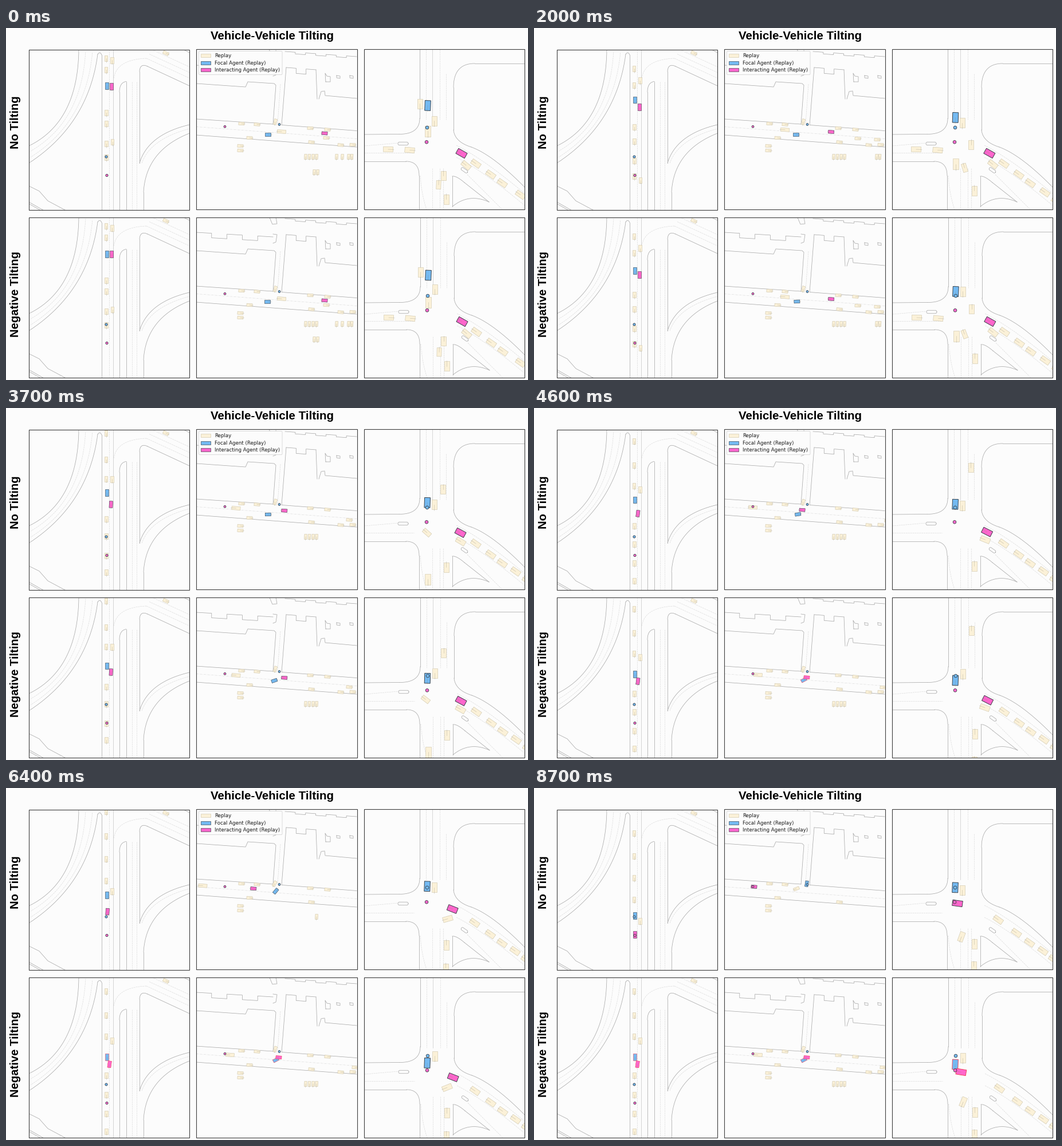
A matplotlib script for the animation above (8800 ms loop, 911 px wide and 615 px high).

```python
import numpy as np
import matplotlib.pyplot as plt
from matplotlib.animation import FuncAnimation
from matplotlib.patches import Circle, FancyBboxPatch, Polygon, Rectangle

W, H, DPI = 911, 615, 64
FRAMES, STEP = 88, 100
LAST = FRAMES - 1
PX = 72 / DPI                      # points per pixel

PAPER, FRAME, INK = "#fcfcfc", "#3c3c3c", "#303840"
TAN, BLUE, PINK = "#fbf1d8", "#74baf2", "#ff66cc"
TAN_EDGE, HIT_EDGE = "#d0c7ad", "#f03c50"
ROAD, LANE = "#a8a8a8", "#d9d9d9"

fig = plt.figure(figsize=(W / DPI, H / DPI), dpi=DPI, facecolor=PAPER)
ax = fig.add_axes([0, 0, 1, 1])
ax.set_xlim(0, W)
ax.set_ylim(H, 0)
ax.axis("off")


class Panel:
    """One map window; its replay runs `lead` steps ahead and halts at `stop`."""

    def __init__(self, x, y, shift=(0, 0), stop=LAST, lead=0, outline=0.55):
        self.shift, self.stop, self.lead = np.array(shift), stop, lead
        self.outline = outline
        self.box = Rectangle((x, y), 280.5, 280, fc="none", ec=FRAME, lw=1.1 * PX, zorder=9)
        ax.add_patch(self.box)

    def add(self, artist):
        ax.add_artist(artist)
        artist.set_clip_path(self.box)
        return artist


LEFT = [Panel(39.5, 37.5), Panel(39.5, 331, (0, 293), 49)]
MID = [Panel(332, 37.3), Panel(332, 331, (0, 292), 42)]
RIGHT = [Panel(624.5, 37.3, outline=0.9),
         Panel(624.5, 331.3, (1, 294), 85, lead=2, outline=0.9)]


# ---------- road maps ----------
def bezier(a, b, c, s):
    a, b, c = (np.array(v, float) for v in (a, b, c))
    return (1 - s) ** 2 * a + 2 * s * (1 - s) * b + s * s * c


def line(panels, pts, color=ROAD, lw=0.75, ls="-"):
    for p in panels:
        x, y = (np.array(pts, float) + p.shift).T
        p.add(plt.Line2D(x, y, color=color, lw=lw * PX, ls=ls, zorder=1))


def edge(panels, *pts):
    line(panels, pts)


def arc(a, b, c):
    return bezier(a, b, c, np.linspace(0, 1, 30)[:, None])


def bend(panels, a, corner, c):
    line(panels, arc(a, corner, c))


def lane(panels, pts, ls=(0, (5, 1.5))):
    line(panels, pts, LANE, 0.6, ls)


def uprights(panels, xs, y0, y1):
    for x in xs:
        lane(panels, [(x, y0), (x, y1)])


def pill(panels, x, y, w, h, deg):
    a = np.linspace(0, 2 * np.pi, 41)
    px = np.cos(a) * h / 2 + np.sign(np.cos(a)) * (w - h) / 2
    py = np.sin(a) * h / 2
    c, s = np.cos(np.radians(deg)), np.sin(np.radians(deg))
    line(panels, np.c_[x + c * px - s * py, y + s * px + c * py])


def roof(panels, a, b, teeth, depth):
    """Stepped wall from a to b, every second stretch pushed in."""
    u = np.repeat(np.linspace(0, 1, 2 * teeth + 2), 2)[1:-1, None]
    push = np.tile([0, 0, depth, depth], teeth + 1)[:len(u)]
    pts = np.array(a) + u * (np.array(b) - a)
    line(panels, pts + np.c_[0 * push, push])


def left_map(p):
    outer = arc((127, 37), (126, 164), (40, 206))
    inner = arc((160, 46), (144, 168), (40, 236))
    line(p, outer)
    line(p, inner)
    for k in (0.36, 0.72):
        lane(p, outer + k * (inner - outer))
    bend(p, (160, 46), (164, 40), (167, 47))
    edge(p, (167, 47), (167, 318))
    uprights(p, [180], 37, 318)
    line(p, [(187, 37), (187, 318)], color="#c8c8c8")
    lane(p, arc((188, 88), (193, 55), (245, 53)))
    edge(p, (198, 318), (198, 112))
    bend(p, (198, 112), (198, 95), (210, 93.5))
    edge(p, (210, 93.5), (210, 318))
    uprights(p, (220, 228), 94, 318)
    edge(p, (233, 236), (233, 76))
    bend(p, (233, 76), (234, 61), (247, 67))
    edge(p, (247, 67), (320, 101))
    bend(p, (233, 236), (248, 186), (320, 169))
    edge(p, (240, 318), (240, 287))
    bend(p, (240, 287), (244, 214), (320, 184))
    lane(p, arc((237, 236), (252, 194), (320, 176)))
    for k in range(3):
        x, y = 245 + 5 * k, 53 - 7.5 * k
        lane(p, [(x, y), (320, y + (320 - x) * 0.46)])
    edge(p, (308, 37), (320, 43))
    edge(p, (40, 276), (58, 285), (73, 302), (103, 318))
    for y in (304, 307):
        edge(p, (40, y), (40 + 1.75 * (318 - y), 318))


def mid_map(p):
    edge(p, (332, 159), (466, 168))
    edge(p, (332, 187), (612, 208))
    lane(p, [(332, 172.5), (612, 193.5)], ls=(0, (6, 2, 1, 2)))
    lane(p, [(479, 98), (474, 167)])
    edge(p, (332, 97), (418, 103), (422, 94), (468, 97), (471, 100), (466, 168))
    edge(p, (612, 179.5), (481, 169.5), (489, 69))
    roof(p, (489, 69), (541, 73), 1, 9)
    edge(p, (541, 73), (543, 124))
    edge(p, (546, 124), (550, 111), (556, 110), (557, 118), (612, 123))
    edge(p, (558, 94), (557, 79), (560, 84), (566, 85), (566, 94), (558, 94))
    for x in (577, 600):
        edge(p, (x, 83), (x + 6, 84), (x + 6, 88), (x, 87), (x, 83))
    roof(p, (487, 41), (612, 50), 3, 3)
    edge(p, (459, 37), (465, 51), (473, 50), (471, 39))
    roof(p, (332, 65), (466, 73), 2, 8)
    edge(p, (466, 84), (471, 82), (473, 69), (466, 68))


def right_map(p):
    edge(p, (722, 37), (722, 158))
    bend(p, (722, 158), (722, 185.5), (686, 185.5))
    edge(p, (686, 185.5), (625, 186))
    edge(p, (625, 233), (698, 233))
    bend(p, (698, 233), (721, 233), (721, 258))
    edge(p, (721, 258), (721, 317))
    edge(p, (905, 62), (818, 62))
    bend(p, (818, 62), (781, 62), (781, 104))
    edge(p, (781, 104), (781, 178))
    bend(p, (781, 178), (783, 199), (812, 208))
    bend(p, (812, 208), (850, 222), (905, 278))
    edge(p, (779, 312), (779, 259))
    bend(p, (779, 259), (786, 258), (800, 270))
    edge(p, (800, 270), (843, 304))
    bend(p, (843, 304), (808, 288), (779, 312))
    pill(p, 693, 202, 18, 5.5, 0)
    pill(p, 800, 248.5, 13, 5, 35)
    line(p, [(744, 37), (744, 160)], color="#cccccc")
    uprights(p, (733, 757), 37, 160)
    uprights(p, [768], 80, 160)
    uprights(p, (744, 757, 763), 245, 317)
    lane(p, [(625, 206), (684, 201)])
    lane(p, [(625, 218), (712, 218)])
    lane(p, arc((723, 258), (725, 290), (734, 317)))
    for y in (205, 226):
        lane(p, arc((786, y), (835, y + 25), (905, y + 84)))
    lane(p, [(805, 256), (866, 317)])


left_map(LEFT)
mid_map(MID)
right_map(RIGHT)


# ---------- motion rules: time -> (x, y, heading) ----------
def facing(deg):
    return np.array([np.cos(np.radians(deg)), np.sin(np.radians(deg))])


def park(x, y, deg):
    return lambda t: (x, y, deg)


def glide(a, b, deg, sway=0):
    """Steady run over the loop; sway > 0 gets ahead half-way, < 0 lags."""
    a, b = np.array(a, float), np.array(b, float)

    def rule(t):
        u = t / LAST
        return (*(a + (b - a) * u + 4 * u * (1 - u) * sway * facing(deg)), deg)
    return rule


def brake(a, b, deg, tau):
    a, b = np.array(a, float), np.array(b, float)
    return lambda t: (*(b + (a - b) * np.exp(-t / tau)), deg)


def turn(a, b, c, rate):
    """Follow a curve, nose along its tangent."""
    def rule(t):
        s = rate(t)
        dx, dy = (1 - s) * (np.subtract(b, a)) + s * np.subtract(c, b)
        return (*bezier(a, b, c, s), np.degrees(np.arctan2(dy, dx)))
    return rule


def power(span, n):
    return lambda t: min(t / span, 1) ** n


def ease(t0, t1):
    def rate(t):
        u = np.clip((t - t0) / (t1 - t0), 0, 1)
        return u * u * (3 - 2 * u)
    return rate


def merge(rule, dx, lean, rate):
    """Add a sideways lane change to another rule."""
    def moved(t):
        x, y, deg = rule(t)
        s = rate(t)
        return x + dx * s, y, deg + 4 * lean * s * (1 - s)
    return moved


# ---------- vehicles ----------
class Car:
    def __init__(self, panel, rule, size, fill, span):
        self.panel, self.rule, self.size, self.span = panel, rule, size, span
        self.agent = fill != TAN
        z = 4 if self.agent else 2
        lw = panel.outline if self.agent else 0.6
        self.body = panel.add(Polygon([(0, 0)] * 4, fc=fill, ec=TAN_EDGE, lw=lw * PX,
                                      joinstyle="miter", zorder=z))
        self.nose = panel.add(plt.Line2D([], [], color="#8c8674", lw=0.6 * PX,
                                         alpha=0.45, zorder=z + 0.1))

    def draw(self, frame):
        p = self.panel
        t = min(frame + (0 if self.agent else p.lead), p.stop)
        for part in (self.body, self.nose):
            part.set_visible(self.span[0] <= t < self.span[1])
        x, y, deg = self.rule(t)
        mid = np.array([x, y]) + p.shift
        ahead, side = facing(deg), facing(deg + 90)
        l, w = self.size[0] / 2, self.size[1] / 2
        self.body.set_xy([mid + i * l * ahead + j * w * side
                          for i, j in ((1, 1), (1, -1), (-1, -1), (-1, 1))])
        tip = mid + (l + 1.5) * ahead
        self.nose.set_data([mid[0], tip[0]], [mid[1], tip[1]])
        if self.agent:
            hit = p.shift.any() and frame >= p.stop
            self.body.set_edgecolor(HIT_EDGE if hit else INK)


cars = []


def car(panels, rule, size, fill=TAN, span=(0, FRAMES)):
    cars.extend(Car(p, rule, size, fill, span) for p in panels)


def dots(panels, blue, pink, r):
    for p in panels:
        for spot, c in ((blue, BLUE), (pink, PINK)):
            p.add(Circle(spot + p.shift, r, fc=c, ec=INK, lw=0.8 * PX, zorder=6))


# left junction: a queue rolling down the road
def down(x, y0, y1, sway=0):
    return glide((x, y0), (x, y1), 90, sway)


S, A = (10, 5.5), (11.5, 6)
car(LEFT, park(279, 44, 25), S)
for y0, speed, sway in ((-65, 1.66, 0), (-11, 1.49, 0), (53, 1.2, -8), (73, 1.4, -1)):
    car(LEFT, down(174.7, y0, y0 + speed * LAST, sway), S)
for y0, speed in ((148, 1.25), (167, 1.55), (202, 1.5), (226, 1.65)):
    car(LEFT, down(175, y0, y0 + speed * LAST), S, span=(0, 58))
car(LEFT, down(184.5, 56, 232, -7), (11, 6))
car(LEFT, down(185.5, 199, 490), S)
car(LEFT[:1], down(175.5, 101, 223, -5), A, BLUE)
car(LEFT[1:], down(175.5, 102, 244, -5), A, BLUE)
car(LEFT, merge(down(184, 102, 256, 1), -8, 8, ease(28, 75)), A, PINK)
dots(LEFT, (175, 225), (176, 257.5), 2.1)

# middle street: parked cars leave over time
S, A = (10, 5), (10, 5.5)
for x, y in ((411, 167), (438, 168.5), (425, 192), (409, 206), (409, 214), (533, 199.5)):
    car(MID, park(x, y, 4), S)
for x, y, end in ((531, 175, 80), (561, 177.5, 80), (584, 204.5, 64), (605, 204, 64)):
    car(MID, park(x, y, 4), S, span=(0, end))
for x, y, count, gap, end in ((523, 225, 3, 6.5, 62), (542, 225, 1, 0, 80),
                              (577, 225, 2, 10, 6), (598, 225, 2, 5.5, 30),
                              (538, 252, 2, 6, 20)):
    for i in range(count):
        car(MID, park(x + i * gap, y, 93), (9, 4.5), span=(0, end))
car(MID, turn((470, 164), (468, 172), (458, 176), power(LAST, 5)), S)
car(MID, glide((481, 181), (294, 167), 184), (15, 6))
for x, y, start in ((559, 192, 0), (525, 190, 5)):
    car(MID, glide((x, y), (x + 174, y + 13), 4), S, span=(start, FRAMES))
car(MID[:1], turn((457, 186), (473, 186), (476, 167), ease(34, 90)), A, BLUE)
car(MID[1:], turn((456, 186), (482, 186), (476, 166), ease(8, 90)), A, BLUE)
car(MID, glide((556, 184), (384, 172.5), 184, -3), A, PINK)
dots(MID, (477, 168.5), (382, 172.3), 1.9)

# right crossing
S, A = (17, 9), (17.5, 10)
car(RIGHT, park(667, 212, 2), S, span=(0, 35))
car(RIGHT, park(704.5, 213.3, 5), S, span=(0, 29))
car(RIGHT, park(722, 132, 90), S, span=(0, 8))
car(RIGHT, down(747, 162, 178), S)
car(RIGHT, down(736, 180, 548, -38), (19, 9.5))
car(RIGHT, glide((763, 258), (762, -122), 270, -47), (16, 9))
car(RIGHT, brake((768, 299), (768, 272), 270, 25), S)
car(RIGHT, brake((767, 640), (767, 309.5), 270, 15), (15, 9))
car(RIGHT, turn((755, 274), (757, 212), (695, 200), power(55, 1.3)), (15, 8), span=(0, 46))
car(RIGHT, turn((803, 240), (765, 208), (746, 260), power(LAST, 2.4)), S)
for x, y, move in ((820, 237, 12), (846, 256, 5), (866, 271, 1.5)):
    end = np.array([x, y]) + move * facing(215)
    car(RIGHT, turn((x, y), (np.array([x, y]) + end) / 2, end, power(LAST, 5)), S)
for x, y, tau in ((888, 284.5, 20), (905, 298, 50)):
    car(RIGHT, brake(np.array([x, y]) - 12 * facing(215), (x, y), 215, tau), S)
car(RIGHT[:1], brake((736, 135.5), (735, 175.5), 92, 27), A, BLUE)
car(RIGHT[1:], brake((736, 138), (734, 191), 92, 26), A, BLUE)
car(RIGHT, turn((795, 219), (772, 206), (739, 201.5), power(LAST, 3.7)), A, PINK)
dots(RIGHT, (735, 174), (734, 199.3), 2.8)


# ---------- text and legend ----------
def heading(x, y, s, size, **kw):
    ax.text(x, y, s, fontsize=size * PX, family="Liberation Sans", weight="bold",
            color="black", ha="center", **kw)


heading(464.3, 20, "Vehicle-Vehicle Tilting", 20.5, va="baseline")
heading(16.5, 165, "No Tilting", 20.2, va="center", rotation=90)
heading(16.5, 465.5, "Negative Tilting", 20.2, va="center", rotation=90)

ax.add_patch(FancyBboxPatch((338, 42), 142.5, 38, boxstyle="round,pad=1.5", fc=PAPER,
                            ec="#d4d4d4", lw=0.8 * PX, zorder=10))
for i, (fill, ec, label) in enumerate(((TAN, TAN_EDGE, "Replay"),
                                       (BLUE, INK, "Focal Agent (Replay)"),
                                       (PINK, INK, "Interacting Agent (Replay)"))):
    y = 48.2 + 12.6 * i
    ax.add_patch(Rectangle((340, y - 3), 17, 6, fc=fill, ec=ec, lw=0.6 * PX, zorder=11))
    ax.text(364, y + 3.1, label, fontsize=8.6 * PX, family="DejaVu Sans", color="#1a1a1a",
            va="baseline", zorder=11)


def draw(frame):
    for c in cars:
        c.draw(frame)
    return []


anim = FuncAnimation(fig, draw, frames=FRAMES, interval=STEP, init_func=lambda: draw(0),
                     repeat=True, repeat_delay=0, blit=False)
plt.show()
```
